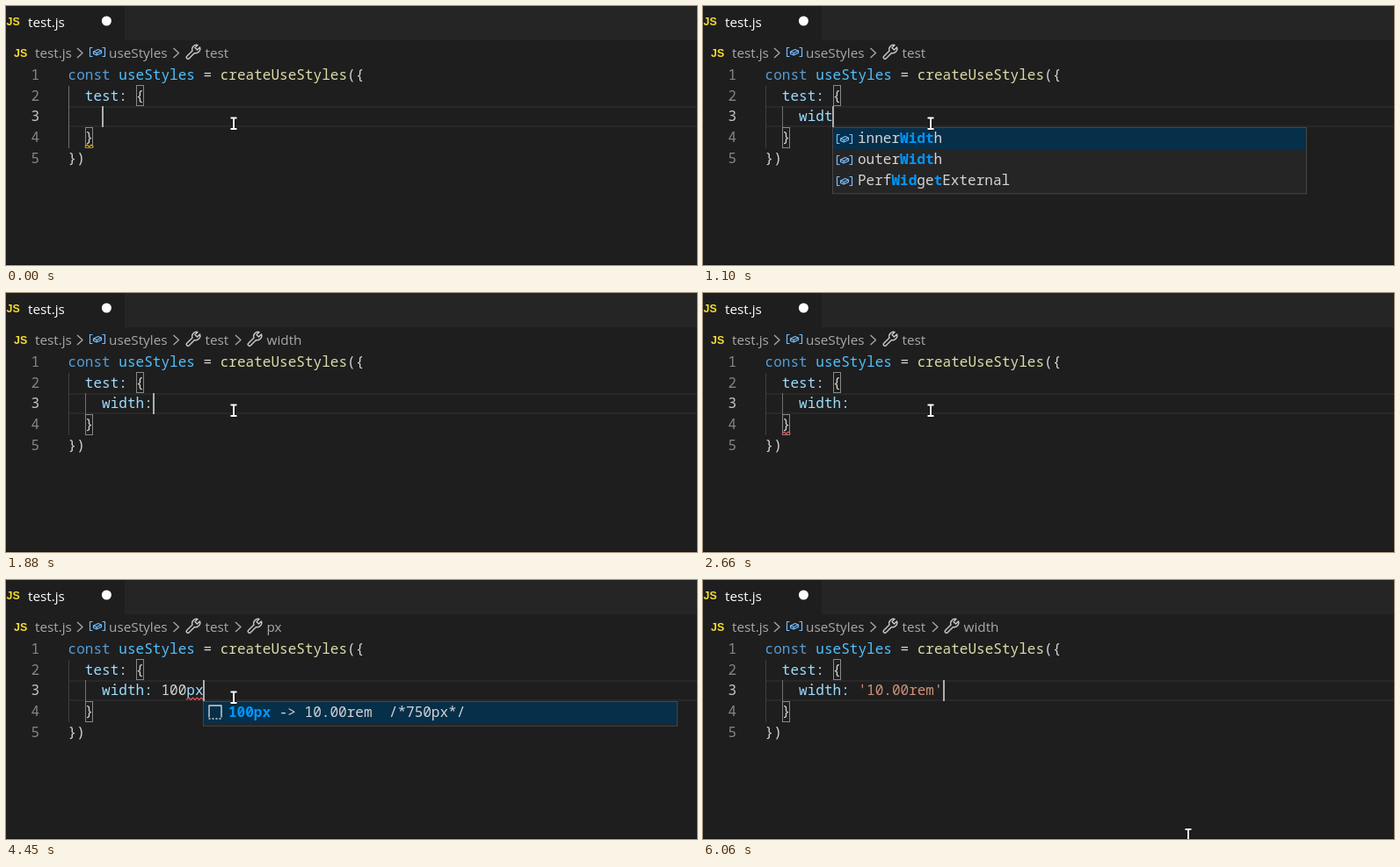
Write an HTML page that moves like this. It is 786x295 px and loops after 6290 ms.

```html
<!DOCTYPE html>
<html lang="en">
<head>
<meta charset="utf-8">
<title>Editor typing</title>
<style>
  html, body { margin: 0; width: 100%; height: 100%; overflow: hidden; background: #1e1e1e; }
  svg { display: block; }
  text { white-space: pre; }
  .mono { font: 500 16.04px "Noto Sans Mono", monospace; }
  .ui { font: 15.3px "Open Sans", sans-serif; }
  .badge { font: bold 12.4px "Liberation Sans", sans-serif; }
  .line { fill: none; stroke-linejoin: round; }
</style>
</head>
<body>
<svg id="stage" width="786" height="295" viewBox="0 0 786 295"></svg>
<script>
const LOOP = 6290, LEFT = 71, CODE_X = 70.6, CHAR = 9.624, ROW = 23.75;
const PLAIN = '#d4d4d4', KEY = '#9cdcfe', HIT = '#0097fb', GREY = '#a9a9a9', BADGE = '#f5de30';
const RED = '#f14c4c', YELLOW = '#cca700';

const TYPED = 'width: 100px';
const KEY_TIMES = [330, 710, 930, 1020, 1170, 1650, 2110, 2740, 2960, 3040, 3270, 3440];

// Asterisks surround the matched letters of a suggestion.
const POPUPS = [
  [0, null],
  [930, { col: 7, rows: ['*wi*n*d*ow', '*Wi*n*d*ow', 'Perf*Wid*getExternal', 'inner*Wid*th', 'outer*Wid*th',
    '*W*r*i*tableStream*D*efaultController', '*W*r*i*tableStream*D*efaultWriter'] }],
  [1090, { col: 8, rows: ['inner*Widt*h', 'outer*Widt*h', 'Perf*Wid*ge*t*External'] }],
  [1250, { col: 9, rows: ['inner*Width*', 'outer*Width*'], detail: 'var innerWidth: number' }],
  [1880, null],
  [3670, { col: 16, rows: ['*100px* -> 10.00rem  /*750px*/'], snippet: true }],
  [4830, null]
];
const CRUMBS = [[0, ''], [1730, 'width'], [2590, ''], [3820, 'px'], [5290, 'width']];
const CARET = [[0, 1], [2660, 0], [2740, 1], [3970, 0], [4450, 1], [5360, 0], [5820, 1]];
// Squiggle: column, line, width in columns, colour
const SQUIGGLE = [[0, [2, 3, 1, YELLOW]], [480, null], [2510, [2, 3, 1, RED]],
  [3890, [14, 2, 2, RED]], [5210, null]];
const MOUSE = [[0, 0], [5900, 1 / 3], [5980, 2 / 3], [6060, 1]];

const at = (list, t) => list.filter(e => e[0] <= t).pop()[1];
const colX = col => Math.floor(LEFT + col * CHAR);
const baseY = line => Math.round(83.75 + line * ROW);
const esc = s => s.replace(/&/g, '&amp;').replace(/</g, '&lt;').replace(/>/g, '&gt;');
const rect = (x, y, w, h, fill, more = '') =>
  `<rect x="${x}" y="${y}" width="${w}" height="${h}" fill="${fill}" ${more}/>`;
const text = (x, y, cls, fill, s) => `<text x="${x}" y="${y}" class="${cls}" fill="${fill}">${esc(s)}</text>`;
const path = (x, y, d, color, width) =>
  `<path class="line" transform="translate(${x} ${y})" d="${d}" stroke="${color}" stroke-width="${width}"/>`;

// parts: [colour, string, bold?]
const code = (x, y, parts) => `<text x="${x}" y="${y}" class="mono">` + parts.map(([c, s, bold]) =>
  `<tspan fill="${c}"${bold ? ' font-weight="700"' : ''}>${esc(s)}</tspan>`).join('') + '</text>';

const variable = (x, y) => path(x, y,
  'M-5.5-5H-8.5V5H-5.5M5.5-5H8.5V5H5.5M-4.5-.5L.8-3L4.5-1.5V1L-.8 3.5L-4.5 2ZM-4.5-.5L-.8 1L4.5-1.5M-.8 1V3.5', '#75beff', 1.2);
const wrench = x => path(x, 52,
  'M7.5-5L4.5-2L2-4.5L5-7.5A5 5 0 0 0-1-1L-7.5 5.5A1.8 1.8 0 0 0-5 8L1.5 1.5A5 5 0 0 0 7.5-5Z', '#c5c5c5', 1.5);
const chevron = x => path(x, 53.5, 'M-3-5.5L3 0L-3 5.5', GREY, 1.3);
const bracketBox = (col, line) => rect(Math.round(CODE_X + col * CHAR) + .5, Math.floor(67 + line * ROW) + .5, 8, 23,
  'none', 'stroke="#888"');

function header(crumb) {
  let s = rect(0, 0, 786, 39, '#252526') + rect(0, 0, 135, 39, '#1e1e1e')
    + text(.6, 22, 'badge', BADGE, 'JS') + text(25, 24, 'ui', '#fff', 'test.js')
    + '<circle cx="114.4" cy="17" r="5.5" fill="#fff"/>'
    + text(9, 58, 'badge', BADGE, 'JS') + text(33, 59, 'ui', GREY, 'test.js')
    + chevron(84) + variable(104, 52.5) + text(117, 59, 'ui', GREY, 'useStyles')
    + chevron(193.5) + wrench(213) + text(226.5, 59, 'ui', GREY, 'test');
  if (crumb) s += chevron(264) + wrench(283) + text(296.5, 59, 'ui', GREY, crumb);
  return s;
}

function valueParts(t, count) {
  if (t >= 4830) return [[KEY, 'width:'], ['#ce9178', " '10.00rem'"]];
  const s = TYPED.slice(0, count);
  const number = count > 10 ? PLAIN : '#b5cea8';
  return [[KEY, s.slice(0, 7)], [number, s.slice(7, 10)], [KEY, s.slice(10)]];
}

function squiggle([col, line, cols, color]) {
  const x = CODE_X + col * CHAR, y = Math.round(67 + (line + 1) * ROW) - 4;
  let d = 'M0 2.5';
  for (let i = 1; i * 2.4 <= cols * CHAR; i++) d += `L${i * 2.4} ${i % 2 ? 0 : 2.5}`;
  return path(x, y, d, color, 1.1);
}

function editor(t) {
  const count = KEY_TIMES.filter(k => k <= t).length;
  const value = valueParts(t, count);
  const caretCol = 4 + value.reduce((n, p) => n + p[1].length, 0);
  const nested = t >= 400;
  let s = rect(LEFT, 114, 715, 2, '#282828') + rect(LEFT, 136, 715, 2, '#282828')
    + rect(LEFT, 91, 1, 71, nested ? '#404040' : '#707070');
  if (nested) s += rect(90, 114, 1, 24, '#707070');
  s += bracketBox(8, 1) + bracketBox(2, 3);
  const lines = [
    [['#569cd6', 'const '], ['#4fc1ff', 'useStyles'], [PLAIN, ' = '], ['#dcdcaa', 'createUseStyles'], [PLAIN, '({']],
    [[KEY, '  test:'], [PLAIN, ' {']],
    [[PLAIN, '    '], ...value],
    [[PLAIN, '  }']],
    [[PLAIN, '})']]
  ];
  lines.forEach((parts, i) => {
    s += text(28.5, baseY(i), 'mono', i === 2 ? '#c6c6c6' : '#858585', String(i + 1)) + code(CODE_X, baseY(i), parts);
  });
  const wave = at(SQUIGGLE, t);
  if (wave) s += squiggle(wave);
  if (at(CARET, t)) s += rect(colX(caretCol), 114, 2, 24, '#aeafad');
  return s;
}

function popup({ col, rows, detail, snippet }) {
  const x = colX(col);
  let s = rect(x + .5, 138.5, 539, rows.length * ROW + 4, '#252526', 'stroke="#454545"')
    + rect(x + 1, 139, 538, 24, '#062f4a');
  rows.forEach((row, i) => {
    const y = Math.round(156.25 + i * ROW);
    const parts = snippet ? [[HIT, '100px', true], [PLAIN, row.slice(7)]]
      : row.split('*').map((p, k) => k % 2 ? [HIT, p, true] : [PLAIN, p]);
    s += code(x + 29, y, parts);
    s += snippet
      ? path(x + 14, 150.5, 'M-7 6V-7.5H7V6M-7.5 7.5h2m2 0h2m2 0h2m2 0h2', PLAIN, 1.4)
      : variable(x + 14, y - 4.5);
  });
  if (detail) s += text(x + 314, 156, 'mono', '#9aa6ad', detail);
  return s;
}

function mouse(part) {
  const x = 259 + 293 * part, y = 126.5 + 156.5 * part, beam = 'M-3.5 1H3.5M-3.5 13.5H3.5M0 1V13.5';
  return path(x, y, beam, '#111', 3.4) + path(x, y, beam, '#fff', 2);
}

const stage = document.getElementById('stage');
let shown = '';
function draw() {
  const t = performance.now() % LOOP;
  const list = at(POPUPS, t);
  const picture = rect(0, 0, 786, 295, '#1e1e1e') + header(at(CRUMBS, t)) + editor(t)
    + rect(0, 294, 786, 1, '#141414') + (list ? popup(list) : '') + mouse(at(MOUSE, t));
  if (picture !== shown) stage.innerHTML = shown = picture;
  requestAnimationFrame(draw);
}
draw();
</script>
</body>
</html>
```
